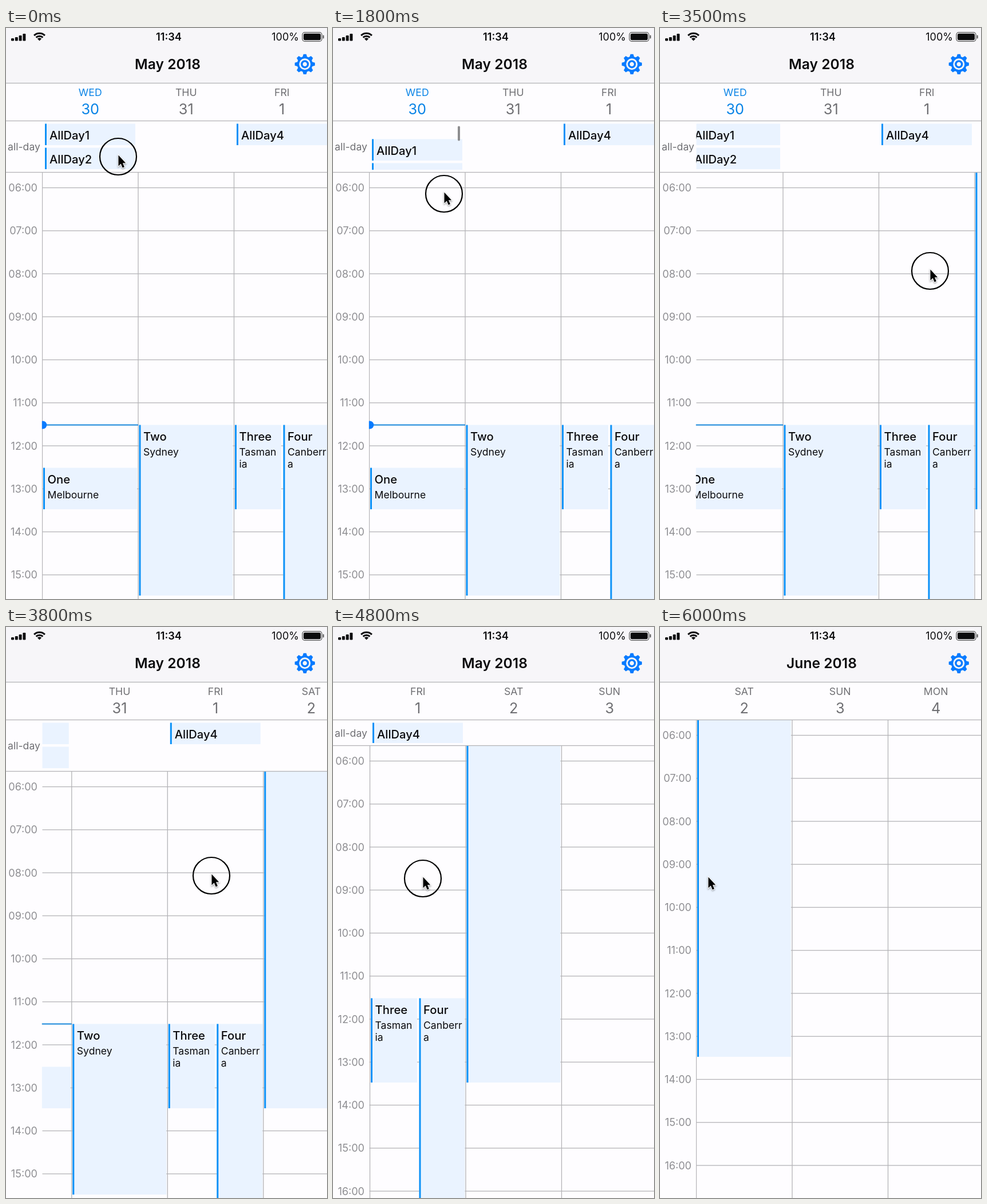
An HTML page with a canvas for the animation above (6.1 s loop, 561 by 999 pixels).

```html
<!DOCTYPE html>
<html lang="en">
<head>
<meta charset="utf-8">
<title>Week calendar</title>
<style>
  html, body { margin: 0; width: 100%; height: 100%; overflow: hidden; background: #fefdff; }
  canvas { display: block; width: 561px; height: 999px; }
</style>
</head>
<body>
<canvas id="stage"></canvas>
<script>
const W = 561, H = 999, LOOP = 6100, STEP = 100;
const LEFT = 63.5, COL = 167.5, HOUR = 75.25, HEAD = 162.5;
const BLUE = '#0b91f7', PALE = '#eaf3ff', GRID = '#b4b4b7', GRAY = '#6f6f73';
const PAGE = '#fefdff', BAR = '#f7f6f9', INK = '#0b0b0d', TINT = '#087bff';

const canvas = document.getElementById('stage');
const ratio = window.devicePixelRatio || 1;
canvas.width = W * ratio;
canvas.height = H * ratio;
const ctx = canvas.getContext('2d');
ctx.scale(ratio, ratio);

const days = [['WED', 30], ['THU', 31], ['FRI', 1], ['SAT', 2], ['SUN', 3], ['MON', 4], ['TUE', 5]];
const allDay = [
  { day: 0, row: 0, title: 'AllDay1' }, { day: 0, row: 1, title: 'AllDay2' },
  { day: 0, row: 2, title: 'AllDay3' }, { day: 2, row: 0, title: 'AllDay4' }
];
// x, top and bottom are relative to the day column and the top of the hour grid
const events = [
  { day: 0, x: 1.5, w: 164, top: 517, bottom: 589.5, title: 'One', place: ['Melbourne'] },
  { day: 1, x: 1.5, w: 164, top: 442, bottom: 740.5, title: 'Two', place: ['Sydney'] },
  { day: 2, x: 1.5, w: 81, top: 442, bottom: 589.5, title: 'Three', place: ['Tasman', 'ia'] },
  { day: 2, x: 86, w: 80, top: 442, bottom: 900, title: 'Four', place: ['Canberr', 'a'] },
  { day: 3, x: 1.5, w: 164, top: -60, bottom: 589.5, title: 'Five', place: [] }
];

// Pointer path: time, x, y
const path = [
  [0, 196, 225], [300, 196, 192], [700, 195, 132], [900, 195, 125], [1200, 195, 129],
  [1400, 195, 148], [1500, 195, 167], [1800, 194, 290], [2000, 194, 304], [2100, 194, 305],
  [2300, 268, 342], [2500, 400, 402], [2700, 463, 422], [2800, 463, 417], [3200, 492, 421],
  [3300, 492, 421], [3500, 472, 425], [3600, 443, 429], [3800, 359, 435], [4000, 258, 439],
  [4100, 242, 440], [4300, 205, 440], [4600, 162, 440], [4800, 157, 440], [4900, 150, 440],
  [5300, 80, 440], [5400, 74, 440], [6000, 84, 440], [LOOP, 84, 440]
];

function pointer(t) {
  const i = Math.max(1, path.findIndex(p => p[0] >= t));
  const [t0, x0, y0] = path[i - 1], [t1, x1, y1] = path[i];
  const k = (t - t0) / (t1 - t0);
  return { x: x0 + (x1 - x0) * k, y: y0 + (y1 - y0) * k };
}

const VIEW = 81, MAX_OFFSET = 41;
const rubber = d => (1 - 1 / (d * 0.62 / VIEW + 1)) * VIEW;

function allDayOffset(t) {
  const drag = 225 - pointer(Math.min(t, 2100)).y;
  const offset = drag < 0 ? -rubber(-drag)
    : drag > MAX_OFFSET ? MAX_OFFSET + rubber(drag - MAX_OFFSET) : drag;
  return t > 2100 ? offset * Math.exp((2100 - t) / 90) : offset;
}

// The week follows the finger slightly late, then snaps to a whole column
function weekShift(t) {
  if (t <= 3300) return 0;
  const dragged = 492 - pointer(Math.min(t, 5400) - 40).x;
  const k = Math.min(1, Math.max(0, (t - 5400) / 500));
  return dragged + (3 * COL - dragged) * (1 - (1 - k) ** 3);
}

function text(str, x, y, size, color = INK, weight = 400, align = 'left') {
  ctx.font = `${weight} ${size}px Inter, "Liberation Sans", sans-serif`;
  ctx.fillStyle = color;
  ctx.textAlign = align;
  ctx.fillText(str, x, y);
}

function rect(x, y, w, h, color) {
  ctx.fillStyle = color;
  ctx.fillRect(x, y, w, h);
}

function pill(x, y, w, h, r, color) {
  ctx.fillStyle = color;
  ctx.beginPath();
  ctx.roundRect(x, y, w, h, r);
  ctx.fill();
}

function arc(x, y, r, width, color, from = 0, to = Math.PI * 2) {
  ctx.beginPath();
  ctx.arc(x, y, r, from, to);
  ctx.lineWidth = width;
  ctx.strokeStyle = color;
  ctx.stroke();
}

const hLine = (y, x = 0) => rect(x, y - 0.65, W - x, 1.3, GRID);

function clipped(x, y, w, h, draw) {
  ctx.save();
  ctx.beginPath();
  ctx.rect(x, y, w, h);
  ctx.clip();
  draw();
  ctx.restore();
}

function block(x, y, w, h) {
  rect(x, y, w, h, PALE);
  rect(x, y, 3, h, BLUE);
}

function gear(x, y) {
  ctx.save();
  ctx.translate(x, y);
  arc(0, 0, 11.8, 3.6, TINT);
  arc(0, 0, 5.4, 3.4, TINT);
  ctx.fillStyle = TINT;
  for (let i = 0; i < 8; i++) {
    ctx.beginPath();
    ctx.moveTo(-4, -12.5);
    ctx.lineTo(-2.5, -17.6);
    ctx.lineTo(2.5, -17.6);
    ctx.lineTo(4, -12.5);
    ctx.fill();
    ctx.rotate(Math.PI / 4);
  }
  ctx.restore();
}

function topBar(month) {
  rect(0, 0, W, 96.5, BAR);
  [4.5, 6.5, 9.5, 12.5].forEach((h, i) => pill(9 + i * 6.8, 22.5 - h, 5, h, 1.2, INK));
  const up = -Math.PI / 2, half = Math.PI / 4;
  [[2.6, 5.2], [8.3, 3], [13.3, 3]].forEach(([r, w]) => arc(58.5, 22.5, r, w, INK, up - half, up + half));
  text('11:34', 284.5, 22, 18.3, INK, 600, 'center');
  text('100%', 512, 22, 18, INK, 400, 'right');
  ctx.lineWidth = 1.3;
  ctx.strokeStyle = '#555';
  ctx.beginPath();
  ctx.roundRect(518, 7.7, 34, 15.6, 4);
  ctx.stroke();
  pill(520, 9.7, 30, 11.6, 2.2, INK);
  pill(553.7, 12.5, 2, 6, 1, '#555');
  text(`${month} 2018`, 282.5, 72.3, 24.6, INK, 600, 'center');
  gear(522.3, 63.3);
  hLine(96.5);
}

function dayHeader(shift) {
  clipped(LEFT, 97, W, 65, () => days.forEach(([name, date], i) => {
    const x = LEFT + (i + 0.5) * COL - shift, color = i ? GRAY : '#0a84e6';
    text(name, x, 119.3, 17.7, color, 400, 'center');
    text(date, x, 151, 25.3, color, 400, 'center');
  }));
  hLine(HEAD);
}

function allDayRow(t, shift, height) {
  if (!height) return;
  text('all-day', 31.5, HEAD + height / 2 + 6.5, 17.6, GRAY, 400, 'center');
  const offset = allDayOffset(t), h = Math.min(37.5, height - 9);
  clipped(LEFT, HEAD + 4, W, height - 8.5, () => {
    for (const { day, row, title } of allDay) {
      const x = LEFT + 4.5 + day * COL - shift;
      const y = HEAD + 5 + row * 42 - (day ? 0 : offset);
      block(x, y, 158, h);
      text(title, x + 8, y + 27.5, 20.2, INK, 500);
    }
    if (t > 0 && t < 2500) {
      const inside = Math.min(MAX_OFFSET, Math.max(0, offset));
      const over = offset - inside;
      ctx.globalAlpha = Math.min(1, (2500 - t) / 300);
      pill(218, 171.5 + inside / MAX_OFFSET * 20 + Math.max(0, over), 4, 53 - Math.abs(over), 2, '#8d8d8f');
      ctx.globalAlpha = 1;
    }
  });
  hLine(HEAD + height);
}

function hourGrid(shift, top) {
  clipped(0, top, W, H, () => {
    for (let hour = 6; hour < 18; hour++) {
      const y = top + 27 + (hour - 6) * HOUR;
      hLine(y, LEFT);
      text(`${String(hour).padStart(2, '0')}:00`, 55, y + 6.5, 18.1, '#8e8e92', 400, 'right');
    }
  });
  clipped(LEFT - 0.7, top + 0.6, W, H, () => {
    days.forEach((_, i) => rect(LEFT + i * COL - shift - 0.65, top, 1.3, H, GRID));
    for (const e of events) {
      const x = LEFT + e.day * COL + e.x - shift, y = top + e.top;
      block(x, y, e.w, e.bottom - e.top);
      text(e.title, x + 7.5, y + 27.7, 20.3, INK, 500);
      e.place.forEach((line, i) => text(line, x + 7.5, y + 53.5 + i * 21, 17.6));
    }
    const now = top + 442;
    rect(LEFT - shift, now - 1, COL, 2, '#1686da');
    ctx.fillStyle = TINT;
    ctx.beginPath();
    ctx.arc(LEFT + 0.8 - shift, now, 7, 0, Math.PI * 2);
    ctx.fill();
  });
}

function cursor(t) {
  const { x, y } = pointer(t);
  if (t <= 2100 || (t >= 2800 && t <= 5400)) arc(x, y, 32, 2.2, '#000');
  ctx.save();
  ctx.translate(x + 0.5, y - 2.5);
  ctx.scale(0.88, 0.9);
  const arrow = new Path2D('M0 0V21L4.8 16.6L8.2 24.4L11.8 22.8L8.5 15.2H14.4Z');
  ctx.shadowColor = 'rgba(0,0,0,.4)';
  ctx.shadowBlur = 3 * ratio;
  ctx.shadowOffsetY = 1.5 * ratio;
  ctx.lineWidth = 2.2;
  ctx.strokeStyle = '#fff';
  ctx.stroke(arrow);
  ctx.shadowColor = 'transparent';
  ctx.fillStyle = '#000';
  ctx.fill(arrow);
  ctx.restore();
}

function draw(t) {
  const shift = weekShift(t);
  const height = shift < COL ? 90 : shift < 3 * COL - 0.5 ? 45 : 0;
  rect(0, 0, W, H, PAGE);
  hourGrid(shift, HEAD + height);
  allDayRow(t, shift, height);
  dayHeader(shift);
  topBar(t < 5900 ? 'May' : 'June');
  cursor(t);
}

const start = performance.now();
function frame() {
  const t = (performance.now() - start) % LOOP;
  draw(Math.floor(t / STEP) * STEP);
  requestAnimationFrame(frame);
}
frame();
</script>
</body>
</html>
```
